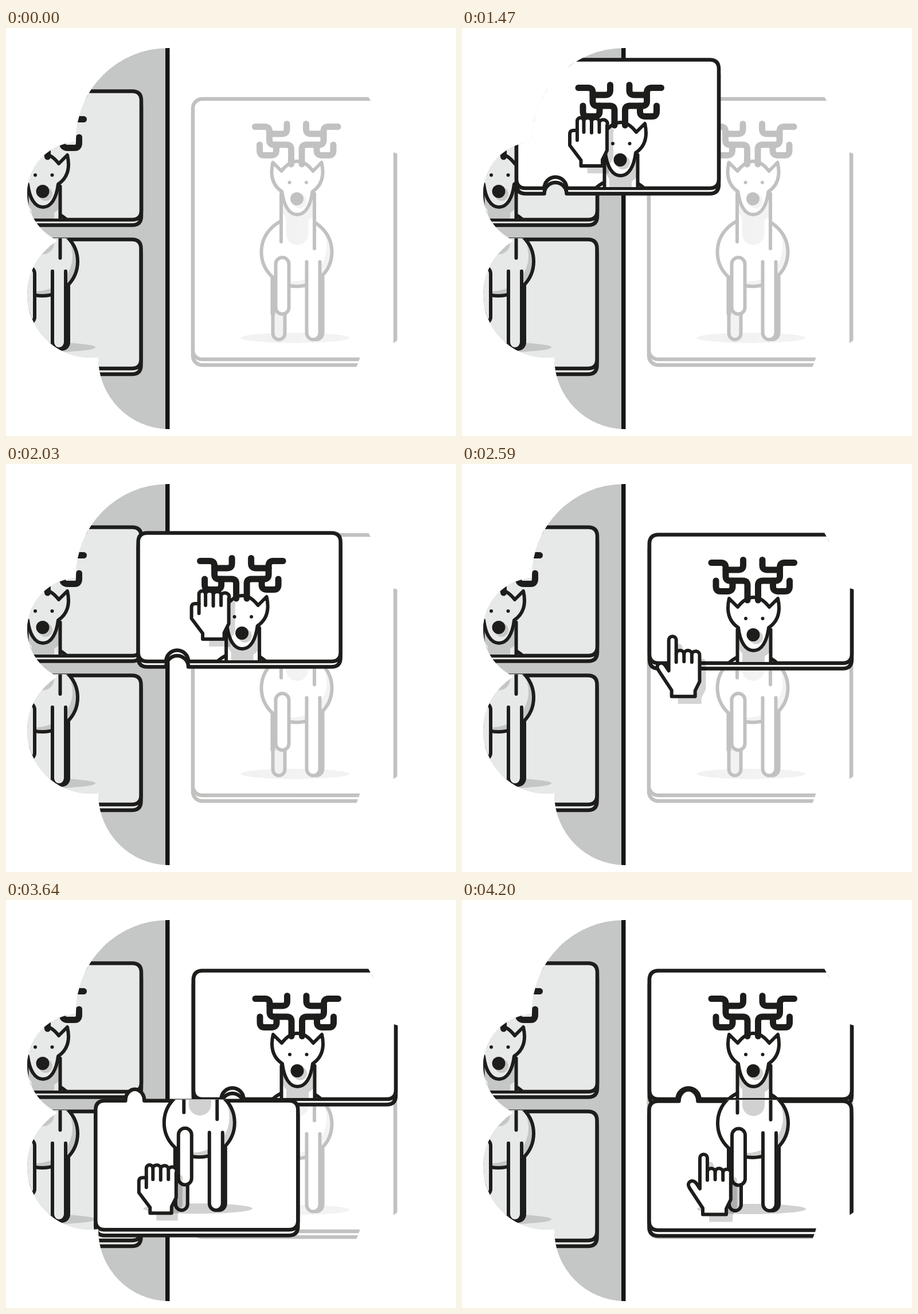
Write an HTML page that moves like this. It is 785 px wide and 713 px high and loops after 4900 ms.

```html
<!DOCTYPE html>
<html lang="en">
<head>
<meta charset="utf-8">
<title>Reindeer puzzle</title>
<style>
  html, body { margin: 0; width: 100%; height: 100%; overflow: hidden; background: #fff; }
  svg { display: block; width: 785px; height: 713px; --paper: #fff; --shade: #d1d1d1; --ink: #1d1d1b; }
  .panel { --paper: #e6e9e8; --shade: #c5c7c6; }
  .line, .thick, .edge { stroke: var(--ink); stroke-width: 6; fill: none; stroke-linecap: round; stroke-linejoin: round; }
  .thick { stroke-width: 11; }
  .edge { stroke-width: 6.5; fill: var(--paper); }
  .paper { fill: var(--paper); }
  .shade { fill: var(--shade); }
  .ink { fill: var(--ink); }
</style>
</head>
<body>
<svg viewBox="0 0 785 713">
  <defs>
    <clipPath id="cloud">
      <circle cx="283" cy="196" r="161"/>
      <circle cx="127" cy="289" r="90"/>
      <circle cx="147" cy="466" r="110"/>
      <circle cx="285" cy="577" r="124"/>
      <circle cx="497" cy="200" r="157"/>
      <circle cx="655" cy="309" r="94"/>
      <circle cx="612" cy="449" r="120"/>
      <circle cx="502" cy="543" r="120"/>
      <rect x="147" y="196" width="453" height="379"/>
      <rect x="283" y="35" width="214" height="666"/>
    </clipPath>
    <clipPath id="upper"><path d="M320 100H690V346H320Z"/></clipPath>
    <clipPath id="lower"><path d="M320 349.500H690V570H320Z"/></clipPath>
    <clipPath id="belly"><ellipse cx="507.5" cy="390" rx="61.5" ry="60"/></clipPath>

    <g id="antler" class="thick">
      <path d="M435 172.5H452Q460 172.5 460 181V196Q460 204 468 204H490Q498 204 498 212V238"/>
      <path d="M490.500 167.5V177Q490.500 185 482 185H460"/>
      <path d="M443 204V214Q443 222.5 451 222.5H463Q472 222.5 472 214V204"/>
    </g>

    <g id="deer">
      <g transform="translate(0 1.5)">
        <ellipse class="shade" cx="505" cy="540" rx="95" ry="9"/>
        <path class="line" style="fill:var(--shade)" d="M466 430V532a10.500 11 0 0 0 21 0V430"/>
        <path class="ink" d="M462 430H470V500H462Z"/>
        <g clip-path="url(#belly)">
          <ellipse class="shade" cx="507.5" cy="390" rx="62" ry="61"/>
          <ellipse class="paper" cx="497" cy="380" rx="63" ry="62"/>
        </g>
        <ellipse class="line" cx="507.5" cy="390" rx="61.5" ry="60"/>
        <path class="paper" d="M481 290H538V376H481Z"/>
        <path class="shade" d="M489 300H528V358a19.5 19.5 0 0 1-39 0Z"/>
        <path class="shade" d="M483 300H538V325Q530 338 510 338Q490 338 483 320Z"/>
        <path class="line" d="M480.500 288V372M538.500 288V384"/>
        <path class="ink" d="M538 432H556V531a14 15 0 0 1-28 0Z"/>
        <path class="line" style="fill:var(--paper)" d="M525 407V531a11.500 12 0 0 0 23 0V407"/>
        <rect class="line" style="fill:var(--paper)" x="471" y="399.500" width="23" height="99" rx="11.500"/>
      </g>
      <path class="line" style="fill:var(--paper)" d="M466 235L481 250Q494 233 508.500 233Q523 233 536 250L551 235Q559 270 535 286C532 310 523 326 508.500 326C494 326 485 310 482 286Q458 270 466 235Z"/>
      <use href="#antler"/>
      <use href="#antler" transform="translate(1014.500) scale(-1 1)"/>
      <circle class="shade" cx="513" cy="303" r="12"/>
      <circle class="ink" cx="508" cy="298.500" r="11.500"/>
      <circle class="ink" cx="495" cy="270" r="3"/>
      <circle class="ink" cx="524.500" cy="270" r="3"/>
    </g>

    <path id="topEdge" class="edge" d="M343 123.500H664q16 0 16 16V332q0 16-16 16H414.500a19.500 19.500 0 0 0-39 0H343q-16 0-16-16V139.500q0-16 16-16Z"/>
    <path id="lowEdge" class="edge" d="M342.500 351.500H378.500a16.500 20 0 0 1 33 0H663.500q16 0 16 16V561q0 16-16 16H342.500q-16 0-16-16V367.500q0-16 16-16Z"/>

    <g id="topCard">
      <use href="#topEdge" y="9.500"/>
      <use href="#topEdge"/>
      <g clip-path="url(#upper)"><use href="#deer"/></g>
    </g>
    <g id="lowCard">
      <use href="#lowEdge" y="10"/>
      <use href="#lowEdge"/>
      <g clip-path="url(#lower)"><use href="#deer" y="-1.500"/></g>
    </g>

    <path id="openShape" d="M215 271V260L192 225C185 214 198 208 204 217L210 226V172.500a6.500 6.500 0 0 1 13 0V197a6.800 6.500 0 0 1 13.600 0a6.800 6.500 0 0 1 13.600 0a6.800 6 0 0 1 13.600 2V245L256 261V271Z"/>
    <path id="fistShape" d="M207.500 241V231L188 205V186Q188 179 194 179H201V162a5.800 6 0 0 1 11.500 0a6.800 6 0 0 1 13.500 1a6.800 6 0 0 1 13.500 1a6.800 6 0 0 1 13.500 6V214L245 230V241Z"/>
  </defs>

  <g clip-path="url(#cloud)">
    <g class="panel">
      <path fill="#c5c7c6" d="M0 35H280V701H0Z"/>
      <use href="#topCard" x="-444" y="-13"/>
      <use href="#lowCard" x="-444" y="18"/>
      <path fill="#151515" d="M278 35H285.500V701H278Z"/>
    </g>
    <g opacity=".27">
      <rect class="edge" x="326" y="134" width="353" height="455" rx="16"/>
      <rect class="edge" x="326" y="124" width="353" height="455" rx="16"/>
      <use href="#deer" x="-.5"/>
    </g>
    <use id="top" href="#topCard"/>
    <use id="low" href="#lowCard"/>
  </g>

  <g id="open">
    <use href="#openShape" x="11" y="13" opacity=".17"/>
    <use href="#openShape" class="line" style="fill:#fff"/>
    <path class="line" d="M223 197V211M236.600 197V210M250.200 197V211"/>
  </g>
  <g id="fist">
    <use href="#fistShape" x="11" y="13" opacity=".17"/>
    <use href="#fistShape" class="line" style="fill:#fff"/>
    <path class="line" d="M201 179V196M212.500 163V182M226 164V183M239.500 165V182"/>
  </g>
</svg>
<script>
const LOOP = 4900, STEP = 70;
const el = id => document.getElementById(id);
const [topCard, lowCard, open, fist] = ["top", "low", "open", "fist"].map(el);

// Smooth 0..1 ramp; a larger k gives a slower start.
function ease(t, from, to, k = 1) {
  const u = Math.min(1, Math.max(0, (t - from) / (to - from))) ** k;
  return u * u * (3 - 2 * u);
}

function place(node, shown, x = 0, y = 0) {
  node.style.display = shown ? "" : "none";
  node.setAttribute("transform", `translate(${x.toFixed(2)} ${y.toFixed(2)})`);
}

function draw(t) {
  const p = ease(t, 1470, 2340, 1.33);
  const topX = -232 * (1 - p), topY = -68 + 172 * p - 104 * p * p;
  place(topCard, t >= 1260, topX, topY);

  const q = ease(t, 3405, 4085);
  const lowX = -235 * (1 - q), lowY = 13 * (1 - q) ** 8 - 9 * q * (1 - q);
  place(lowCard, t >= 3290, lowX, lowY);

  const holdTop = t >= 1260 && t < 2350;
  const holdLow = t >= 3290 && t < 4130;
  let x, y;
  if (t < 1260) {
    const a = 1 - ease(t, 490, 910), lift = ease(t, 1000, 1260);
    x = 419 * a - 6 * lift;
    y = 301 * a - 30 * lift;
  } else if (t < 3290) {
    const a = ease(t, 2350, 3023);
    x = 226 - 259 * a;
    y = 38 + 247 * (1.5 * a - .5 * a * a);
  } else {
    x = 205;
    y = 278.5;
  }
  place(open, t >= 490 && !holdTop && !holdLow, x, y);
  open.style.opacity = Math.min(1, (t - 420) / 210);

  if (holdTop) place(fist, true, topX + 232, topY + 68);
  else place(fist, holdLow, lowX + 214, lowY + 307);
}

const start = performance.now();
function tick() {
  const t = (performance.now() - start) % LOOP;
  draw(Math.floor(t / STEP) * STEP);
  requestAnimationFrame(tick);
}
tick();
</script>
</body>
</html>
```
